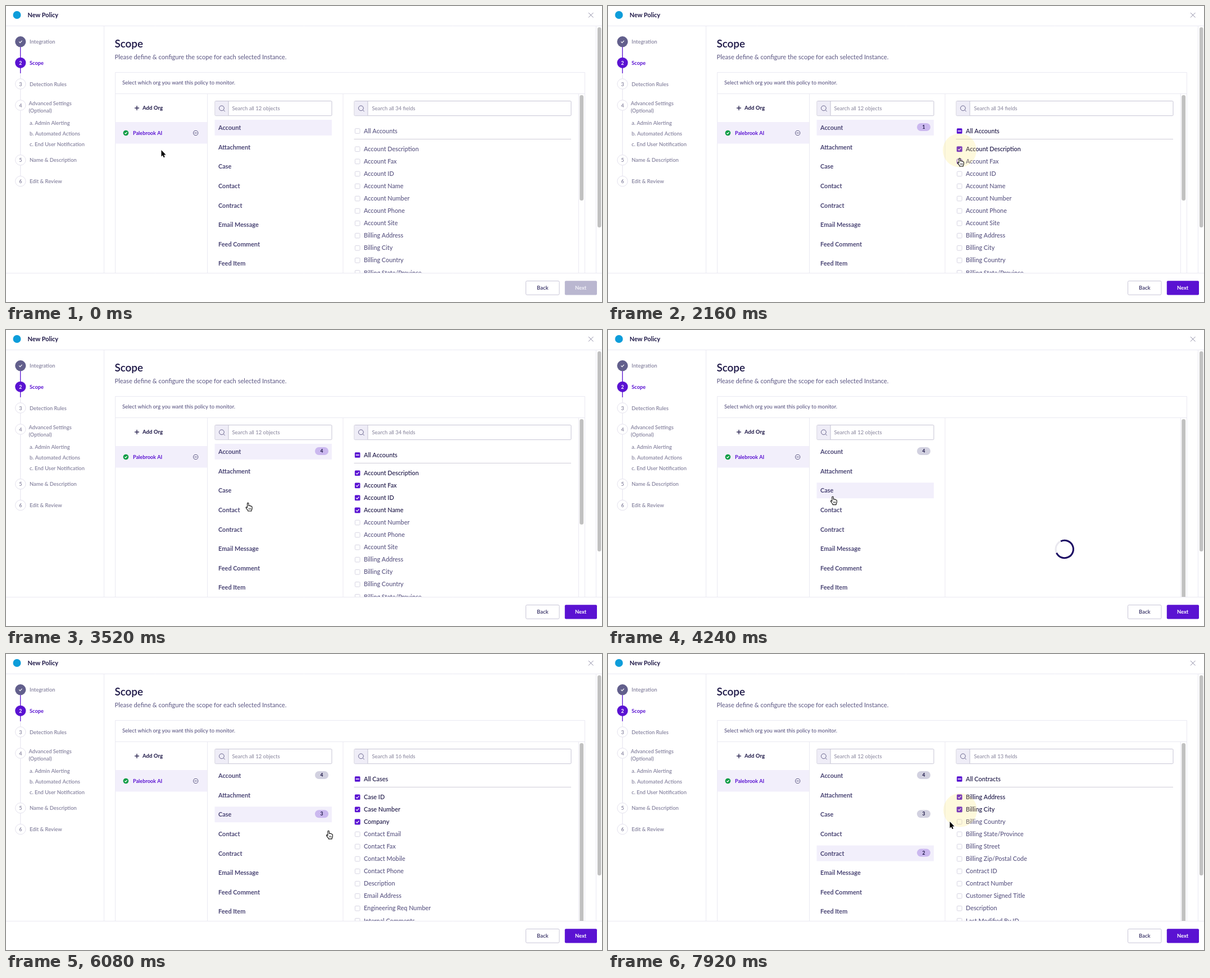
An HTML page with a canvas that plays this animation: 1061 px wide and 528 px high, repeating every 8000 ms.

```html
<!DOCTYPE html>
<html lang="en">
<head>
<meta charset="utf-8">
<title>New Policy</title>
<style>
  html, body { margin: 0; width: 100%; height: 100%; overflow: hidden; background: #fff; }
  canvas { display: block; width: 1061px; height: 528px; }
</style>
</head>
<body>
<canvas id="stage"></canvas>
<script>
const W = 1061, H = 528, LOOP = 8000, STEP = 80;
const canvas = document.getElementById('stage');
const ctx = canvas.getContext('2d');
const dpr = window.devicePixelRatio || 1;
canvas.width = W * dpr;
canvas.height = H * dpr;

const C = {
  ink: '#1b1545', list: '#4b4675', field: '#5a5582', mute: '#86839f', hint: '#85829a',
  purple: '#5a12d2', tint: '#f2effb', line: '#eae9f2', box: '#c6c4d4', thumb: '#c1c1c1'
};

const objects = ['Account', 'Attachment', 'Case', 'Contact', 'Contract',
  'Email Message', 'Feed Comment', 'Feed Item'];

// Each view: list row, opening time, end of loading, field count, tick times.
const views = [
  { row: 0, open: -1, ready: -1, total: 34, thumbEnd: 347, ticks: [2000, 2240, 2480, 2920],
    fields: ['Account Description', 'Account Fax', 'Account ID', 'Account Name', 'Account Number',
      'Account Phone', 'Account Site', 'Billing Address', 'Billing City', 'Billing Country',
      'Billing State/Province'] },
  { row: 2, open: 3920, ready: 4560, total: 16, thumbEnd: 485, ticks: [4960, 5520, 5760],
    fields: ['Case ID', 'Case Number', 'Company', 'Contact Email', 'Contact Fax', 'Contact Mobile',
      'Contact Phone', 'Description', 'Email Address', 'Engineering Req Number',
      'Internal Comments'] },
  { row: 4, open: 6530, ready: 7060, total: 13, thumbEnd: 485, ticks: [7360, 7740],
    fields: ['Billing Address', 'Billing City', 'Billing Country', 'Billing State/Province',
      'Billing Street', 'Billing Zip/Postal Code', 'Contract ID', 'Contract Number',
      'Customer Signed Title', 'Description', 'Last Modified By ID'] }
];

const track = [
  [0, 276.5, 257], [100, 276.5, 257], [960, 394, 240], [1280, 457, 228], [1840, 676, 272],
  [2000, 626, 258], [2080, 626, 259], [2220, 626, 279], [2280, 626, 279], [2440, 626, 300],
  [2520, 626, 301], [2720, 625, 322], [2800, 625, 323], [3000, 625, 323], [3600, 410, 306],
  [3680, 401, 304], [3760, 401, 304], [3920, 401, 298], [4240, 400, 297], [4320, 400, 297],
  [4880, 628, 257], [5040, 628, 258], [5280, 628, 281], [5520, 628, 281], [5720, 628, 301],
  [5880, 628, 301], [6480, 420, 356], [6600, 420, 356], [6880, 637, 290.5], [7120, 628, 263],
  [7200, 628, 265], [7360, 628, 265], [7640, 627, 279], [7740, 627, 279], [7920, 608.5, 299]
];
const clickTimes = views.flatMap(v => [v.open, ...v.ticks]).filter(t => t > 0);
const HALO = 300;

const listY = i => 217 + 34.65 * i;
const fieldY = i => 255.3 + 22.05 * i;

// Monotone cubic interpolation: smooth passes, no overshoot at rests.
function coord(t, k) {
  const slope = i => (track[i + 1][k] - track[i][k]) / (track[i + 1][0] - track[i][0]);
  const tangent = i => {
    if (i <= 0 || i >= track.length - 1) return 0;
    const a = slope(i - 1), b = slope(i);
    return a * b <= 0 ? 0 : 2 * a * b / (a + b);
  };
  let i = 0;
  while (i < track.length - 2 && t > track[i + 1][0]) i++;
  const [p, q] = [track[i], track[i + 1]];
  const d = q[0] - p[0], u = Math.min(1, (t - p[0]) / d), u2 = u * u, u3 = u2 * u;
  return p[k] * (2 * u3 - 3 * u2 + 1) + q[k] * (3 * u2 - 2 * u3)
    + d * (tangent(i) * (u3 - 2 * u2 + u) + tangent(i + 1) * (u3 - u2));
}
const pointer = t => ({ x: coord(t, 1), y: coord(t, 2) });

// y is the middle of the capitals.
function text(str, x, y, size, color, weight = 400, align = 'left') {
  ctx.font = `${weight} ${size}px Lato, "Open Sans", sans-serif`;
  ctx.textAlign = align;
  ctx.fillStyle = color;
  ctx.fillText(str, x, y + size * 0.36);
}
function rect(x, y, w, h, fill, stroke, radius = 0) {
  ctx.beginPath();
  ctx.roundRect(x, y, w, h, radius);
  if (fill) { ctx.fillStyle = fill; ctx.fill(); }
  if (stroke) { ctx.strokeStyle = stroke; ctx.lineWidth = 1; ctx.stroke(); }
}
function circle(x, y, r, fill, stroke, width = 1) {
  ctx.beginPath();
  ctx.arc(x, y, r, 0, 7);
  if (fill) { ctx.fillStyle = fill; ctx.fill(); }
  if (stroke) { ctx.strokeStyle = stroke; ctx.lineWidth = width; ctx.stroke(); }
}
function line(color, width, ...pts) {
  ctx.beginPath();
  for (let i = 0; i < pts.length; i += 2) ctx.lineTo(pts[i], pts[i + 1]);
  ctx.strokeStyle = color;
  ctx.lineWidth = width;
  ctx.stroke();
}
const tick = (x, y, s) => line('#fff', 1.2, x - 2.6 * s, y, x - 0.7 * s, y + 1.9 * s, x + 2.7 * s, y - 1.9 * s);

function header() {
  circle(19.5, 16, 7, '#0d9dda');
  text('New Policy', 38.5, 16.3, 10.9, C.ink, 700);
  line('#8f8da6', 1, 1037, 12, 1045.5, 20.5);
  line('#8f8da6', 1, 1045.5, 12, 1037, 20.5);
  line(C.line, 1, 0, 35.5, W, 35.5);
  line(C.line, 1, 1050.5, 36, 1050.5, 477);
  rect(1053, 38, 6.5, 357, C.thumb, null, 3.2);
}

function sidebar() {
  line(C.line, 1, 174.5, 36, 174.5, 477);
  line(C.line, 1.3, 25.7, 110, 25.7, 312);
  line(C.purple, 1.3, 25.7, 72, 25.7, 120);
  circle(25.8, 63.7, 9.6, '#625f8c');
  tick(25.8, 63.7, 1);
  circle(25.8, 101.3, 9.6, C.purple);
  text('2', 25.8, 101.5, 8.8, '#fff', 700, 'center');
  [['3', 139], ['4', 177], ['5', 274.8], ['6', 312.6]].forEach(([n, y]) => {
    circle(25.8, y, 9.2, '#fff', '#e4e2ee');
    text(n, 25.8, y + 0.3, 9.2, C.mute, 600, 'center');
  });
  const items = [['Integration', 42, 63.7], ['Detection Rules', 42, 139.3],
    ['Advanced Settings', 40.5, 174], ['(Optional)', 40.5, 186.5], ['a. Admin Alerting', 42, 209],
    ['b. Automated Actions', 42, 227.6], ['c. End User Notification', 42, 246.4],
    ['Name & Description', 42, 275], ['Edit & Review', 42, 312.7]];
  items.forEach(([s, x, y]) => text(s, x, y, 9.35, C.mute, 600));
  text('Scope', 42, 101.5, 9.3, C.purple, 700);
}

function searchBox(x, w, label) {
  rect(x + 0.5, 169.5, w, 26.2, '#fff', C.box, 1.5);
  rect(x + 1, 170, 24, 25.2, '#efedf7');
  line(C.box, 1, x + 24.5, 169.5, x + 24.5, 195.7);
  circle(x + 12.4, 182.3, 4.4, null, '#67638d');
  line('#67638d', 1, x + 15.6, 185.5, x + 18.2, 188.2);
  text(label, x + (w > 300 ? 32 : 31), 183, 9.45, C.hint);
}

function orgColumn() {
  line(C.ink, 1.3, 229, 182, 237, 182);
  line(C.ink, 1.3, 233, 178, 233, 186);
  text('Add Org', 243, 182, 9.6, C.ink, 700);
  rect(194.5, 207, 164, 38.5, C.tint);
  circle(213.4, 226.5, 4.8, '#0f9d45');
  tick(213.4, 226.5, 0.8);
  text('Palebrook AI', 226, 226.5, 9.1, C.purple, 700);
  circle(337.7, 226.5, 4.1, null, '#55517d');
  line('#55517d', 1, 335.5, 226.5, 339.9, 226.5);
}

function objectColumn(t, active) {
  searchBox(371.5, 208, 'Search all 12 objects');
  rect(371.5, listY(active.row) - 14, 208.5, 28, C.tint);
  objects.forEach((name, i) => text(name, 378, listY(i), 10.95, C.list, 700));
  views.forEach(v => {
    const count = v.ticks.filter(k => t >= k).length;
    if (!count) return;
    const y = listY(v.row) - 1;
    rect(550, y - 7, 24, 14, v === active ? '#cbb8ef' : '#d2d1e0', null, 7);
    text(count, 562, y, 8.6, C.ink, 700, 'center');
  });
}

function checkbox(y, state, hover, focus) {
  const x = 625.7;
  if (focus) rect(x - 5.5, y - 5.5, 11, 11, '#cdbcf1', null, 2.5);
  if (state) {
    rect(x - 4.8, y - 4.8, 9.6, 9.6, C.purple, null, 1.5);
    if (state === 'some') line('#fff', 1.5, x - 3, y, x + 3, y);
    else tick(x, y, 1);
  } else {
    rect(x - 4.3, y - 4.3, 8.6, 8.6, '#fff', hover ? C.purple : '#d6d4e2', 1.5);
  }
}

function spinner(elapsed) {
  const from = (39.8 + elapsed * 0.36) * Math.PI / 180, quarter = Math.PI / 2;
  circle(812.7, 391, 15.7, null, '#e9e8ef', 3);
  ctx.beginPath();
  ctx.arc(812.7, 391, 15.7, from + quarter, from + 4 * quarter);
  ctx.strokeStyle = '#1c0b63';
  ctx.lineWidth = 3;
  ctx.stroke();
}

function fieldColumn(t, view, loading, at) {
  line(C.line, 1, 1019.5, 156, 1019.5, 477);
  rect(1021.3, 159, 6.8, (loading ? 485 : view.thumbEnd) - 159, C.thumb, null, 3.2);
  if (loading) return spinner(t - view.open);
  searchBox(619.5, 386, `Search all ${view.total} fields`);
  const done = view.ticks.filter(k => t >= k).length;
  checkbox(223, done ? 'some' : '', false, false);
  text(`All ${objects[view.row]}s`, 637, 223, 10.9, done ? C.ink : C.field, 500);
  line('#cfcdd8', 1, 619.5, 237.5, 1006, 237.5);
  view.fields.forEach((name, i) => {
    const y = fieldY(i);
    const hover = Math.abs(at.y - y) < 11 && at.x > 620 && at.x < 745;
    checkbox(y, i < done ? 'on' : '', hover, i === done - 1);
    text(name, 637, y - 0.2, 10.85, i < done ? C.ink : C.field, 500);
  });
}

function footer(enabled) {
  rect(0, 477, W, 51, '#fff');
  line(C.line, 1, 0, 476.5, W, 476.5);
  rect(925.5, 490.5, 59.5, 24.7, '#fff', '#c8c6d7', 2);
  text('Back', 955.3, 502.8, 9.4, C.list, 700, 'center');
  rect(994.8, 490.2, 57.2, 25.2, enabled ? C.purple : '#bab7d0', null, 2);
  text('Next', 1023.2, 502.8, 9.3, enabled ? '#fff' : '#f3f2f8', 700, 'center');
}

const arrow = new Path2D('M0 0V11.6L2.6 9.2L4.3 13.3L6.2 12.5L4.5 8.6H8.1Z');
const hand = new Path2D('M-1.2 1.2Q-1.2 0 0 0Q1.2 0 1.2 1.2V5Q2.6 4.2 3.4 5.3Q4.8 4.8 5.5 6' +
  'Q7.4 5.8 7.4 8V10Q7.2 12 6.2 13V14.6H0V13.4Q-2 11.4-3.6 8.6Q-3.6 7-2.2 7.5L-1.2 8.6Z');
const fingers = new Path2D('M1.6 9V12M3.3 9V12M5 9V12');

function cursor(at, loading) {
  const onList = at.x > 371 && at.x < 580 && at.y > 203;
  const onField = !loading && at.x > 620 && at.x < 745 && at.y > 244;
  ctx.save();
  ctx.translate(at.x, at.y);
  ctx.lineJoin = 'round';
  if (onList || onField) {
    ctx.fillStyle = '#fff';
    ctx.strokeStyle = '#111';
    ctx.lineWidth = 1.1;
    ctx.fill(hand);
    ctx.stroke(hand);
    ctx.lineWidth = 0.7;
    ctx.stroke(fingers);
  } else {
    ctx.strokeStyle = '#fff';
    ctx.lineWidth = 1.8;
    ctx.stroke(arrow);
    ctx.fillStyle = '#000';
    ctx.fill(arrow);
  }
  ctx.restore();
}

function halo(t) {
  clickTimes.forEach(start => {
    const age = t - start;
    if (age < 0 || age >= HALO) return;
    const p = pointer(start);
    const alpha = 0.2 * Math.min(1, (HALO - age) / 100);
    circle(p.x, p.y - 0.5, 30, `rgba(250,225,80,${alpha})`);
  });
}

function draw(t) {
  const view = views.filter(v => t >= v.open).pop();
  const loading = t < view.ready;
  const at = pointer(t);
  ctx.setTransform(dpr, 0, 0, dpr, 0, 0);
  rect(0, 0, W, H, '#fff');
  header();
  sidebar();
  text('Scope', 193.5, 67, 18.8, C.ink, 600);
  text('Please define & configure the scope for each selected Instance.', 193.5, 91, 11.1, C.field);
  ctx.save();
  ctx.beginPath();
  ctx.rect(175, 100, 875, 377);
  ctx.clip();
  rect(194.5, 118.5, 836, 400, null, C.line);
  text('Select which org you want this policy to monitor.', 207, 137, 9.4, C.field, 500);
  line(C.line, 1, 194, 156.5, 1030, 156.5);
  orgColumn();
  line(C.line, 1, 358.5, 156, 358.5, 477);
  line(C.line, 1, 600, 156, 600, 477);
  objectColumn(t, view);
  fieldColumn(t, view, loading, at);
  ctx.restore();
  footer(t >= views[0].ticks[0]);
  halo(t);
  cursor(at, loading);
}

const begin = performance.now();
function frame() {
  const t = (performance.now() - begin) % LOOP;
  draw(Math.floor(t / STEP) * STEP);
  requestAnimationFrame(frame);
}
frame();
</script>
</body>
</html>
```
